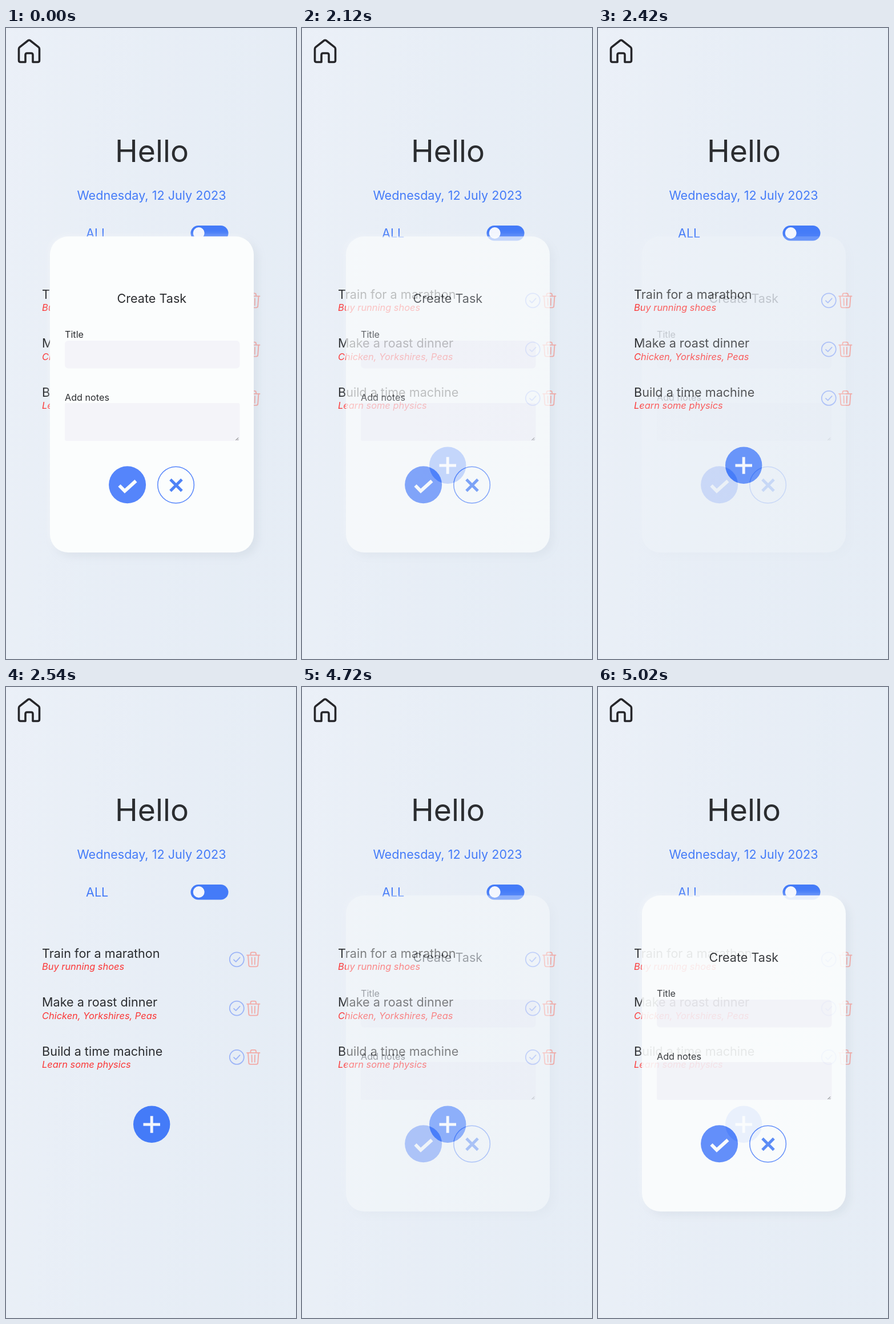
Animation, 508 px wide and 1102 px high, one loop 5.08 s. Source, as an HTML page:

```html
<!DOCTYPE html>
<html lang="en">
<head>
<meta charset="utf-8">
<title>Task list</title>
<style>
  html, body { margin: 0; width: 100%; height: 100%; overflow: hidden; }
  svg { display: block; width: 508px; height: 1102px; font-family: Inter, sans-serif; fill: #2b2d30; }
  .line { fill: none; stroke-linecap: round; stroke-linejoin: round; }
  .mid { text-anchor: middle; }
  .blue { fill: #447bf8; }
  .note { font-size: 16.4px; font-style: italic; fill: #fb3737; }
  .panel { filter: drop-shadow(7px 7px 7px #8090a020) drop-shadow(-3px -3px 4px #ffffff50); }
</style>
</head>
<body>
<svg viewBox="0 0 508 1102">
  <defs>
    <linearGradient id="base" x2="1" y2=".25">
      <stop stop-color="#f5f6fb"/><stop offset=".5" stop-color="#edf1f8"/><stop offset="1" stop-color="#e8eef6"/>
    </linearGradient>
    <radialGradient id="sky" gradientUnits="userSpaceOnUse" r="1" gradientTransform="translate(530 50) scale(240 330)">
      <stop stop-color="#d3e4f5"/><stop offset=".45" stop-color="#d8e7f5"/><stop offset="1" stop-color="#e4eef7" stop-opacity="0"/>
    </radialGradient>
    <radialGradient id="dusk" gradientUnits="userSpaceOnUse" r="1" gradientTransform="translate(0 1110) scale(450 500)">
      <stop stop-color="#a8bcf7"/><stop offset=".25" stop-color="#b5c2f5"/><stop offset=".42" stop-color="#c0ccf4"/>
      <stop offset=".64" stop-color="#cedaf3"/><stop offset=".8" stop-color="#d7e6f4"/>
      <stop offset=".95" stop-color="#dfe9f4" stop-opacity=".8"/><stop offset="1.0" stop-color="#e4ecf5" stop-opacity=".6"/>
    </radialGradient>
    <radialGradient id="haze" gradientUnits="userSpaceOnUse" r="1" gradientTransform="translate(0 1000) scale(560 720)">
      <stop offset=".45" stop-color="#d6e5f4"/><stop offset="1" stop-color="#e2ecf6" stop-opacity="0"/>
    </radialGradient>
    <radialGradient id="cream" gradientUnits="userSpaceOnUse" r="1" gradientTransform="translate(520 1040) scale(110 250)">
      <stop stop-color="#f5f5ea"/><stop offset=".35" stop-color="#f0f2ec"/><stop offset="1" stop-color="#e9eef3" stop-opacity="0"/>
    </radialGradient>
    <g id="icons" class="line" stroke-width="1.8">
      <g stroke="#9db5f7"><circle cx="404.3" r="12.5"/><path d="M399 .5l3.7 3.5 7-7.5"/></g>
      <path stroke="#f2aaa6" d="M422-7.500h22.500M428.500-7.500v-2.500q0-2.500 2.500-2.500h4.500q2.500 0 2.500 2.500v2.500M424-7.500l1.300 17.500q.2 2.500 2.700 2.500h10.500q2.500 0 2.700-2.500l1.300-17.500M430.500-3.500l.3 12M436-3.500l-.3 12"/>
    </g>
  </defs>

  <rect width="508" height="1102" fill="url(#base)"/>
  <rect width="508" height="1102" fill="url(#sky)"/>
  <rect width="508" height="1102" fill="url(#haze)"/>
  <rect width="508" height="1102" fill="url(#dusk)"/>
  <rect width="508" height="1102" fill="url(#cream)"/>

  <path class="line" stroke="#26262a" stroke-width="3.6" d="M22.500 36.500q0-2 1.500-3.200L38.500 22q2-1.500 4 0L57 33.300q1.500 1.200 1.500 3.200V56.500q0 3-3 3H47V47q0-3-3-3H37q-3 0-3 3V59.500H25.500q-3 0-3-3z"/>
  <text class="mid" x="255.500" y="234" font-size="53.500">Hello</text>
  <text class="mid blue" x="255" y="299.500" font-size="21.600">Wednesday, 12 July 2023</text>
  <text class="blue" x="140" y="365.500" font-size="21.600">ALL</text>
  <rect class="blue" x="323.500" y="345" width="66" height="26.500" rx="13.250"/>
  <circle cx="337.700" cy="358" r="10" fill="#f3f6fe"/>

  <g id="tasks"></g>
  <circle class="blue" cx="255.200" cy="763.700" r="32.200"/>
  <path d="M240.500 764h29.500M255.200 749.300v29.500" stroke="#f1f5fd" stroke-width="5"/>

  <g id="dialog">
    <rect class="panel" x="77" y="364" width="357" height="552" rx="32" fill="#fbfdfd"/>
    <text class="mid" x="255.300" y="480" font-size="21.600">Create Task</text>
    <g font-size="16.200"><text x="103" y="541">Title</text><text x="103" y="650.500">Add notes</text></g>
    <g fill="#f4f4f9">
      <rect x="103" y="546" width="306.500" height="48.500" rx="6"/>
      <rect x="103" y="655" width="306.500" height="66" rx="3"/>
    </g>
    <path d="M402.500 720l4.500-4.500M405.500 720l1.500-1.500" stroke="#555"/>
    <circle cx="212.600" cy="797.700" r="32.500" fill="#5585fb"/>
    <path d="M198.500 799l9.500 9.500 19.500-17.500" fill="none" stroke="#fbfdfd" stroke-width="6"/>
    <circle cx="297.600" cy="798" r="31.800" fill="none" stroke="#5585fb" stroke-width="1.500"/>
    <path d="M288 788.500l20 20M308 788.500l-20 20" stroke="#4e82f6" stroke-width="5"/>
  </g>
</svg>
<script>
  const tasks = [
    ["Train for a marathon", "Buy running shoes"],
    ["Make a roast dinner", "Chicken, Yorkshires, Peas"],
    ["Build a time machine", "Learn some physics"]
  ];
  document.getElementById("tasks").innerHTML = tasks.map(([title, note], i) =>
    `<g transform="translate(0 ${475.8 + i * 85.3})">
      <text x="63" y="-2.800" font-size="21.600">${title}</text>
      <text class="note" x="63" y="18.500">${note}</text>
      <use href="#icons"/>
    </g>`).join("");

  const dialog = document.getElementById("dialog");
  const HOLD = 2000, HALF = 2540, STEP = 60;

  // Each half holds for two seconds, then cross-fades in tenths.
  function draw(now) {
    const t = now % (2 * HALF);
    const step = Math.floor((t % HALF - HOLD) / STEP) + 1;
    const faded = Math.max(0, step) / 10;
    dialog.setAttribute("opacity", t < HALF ? 1 - faded : faded);
  }

  const start = performance.now();
  function tick() {
    draw(performance.now() - start);
    requestAnimationFrame(tick);
  }
  tick();
</script>
</body>
</html>
```
